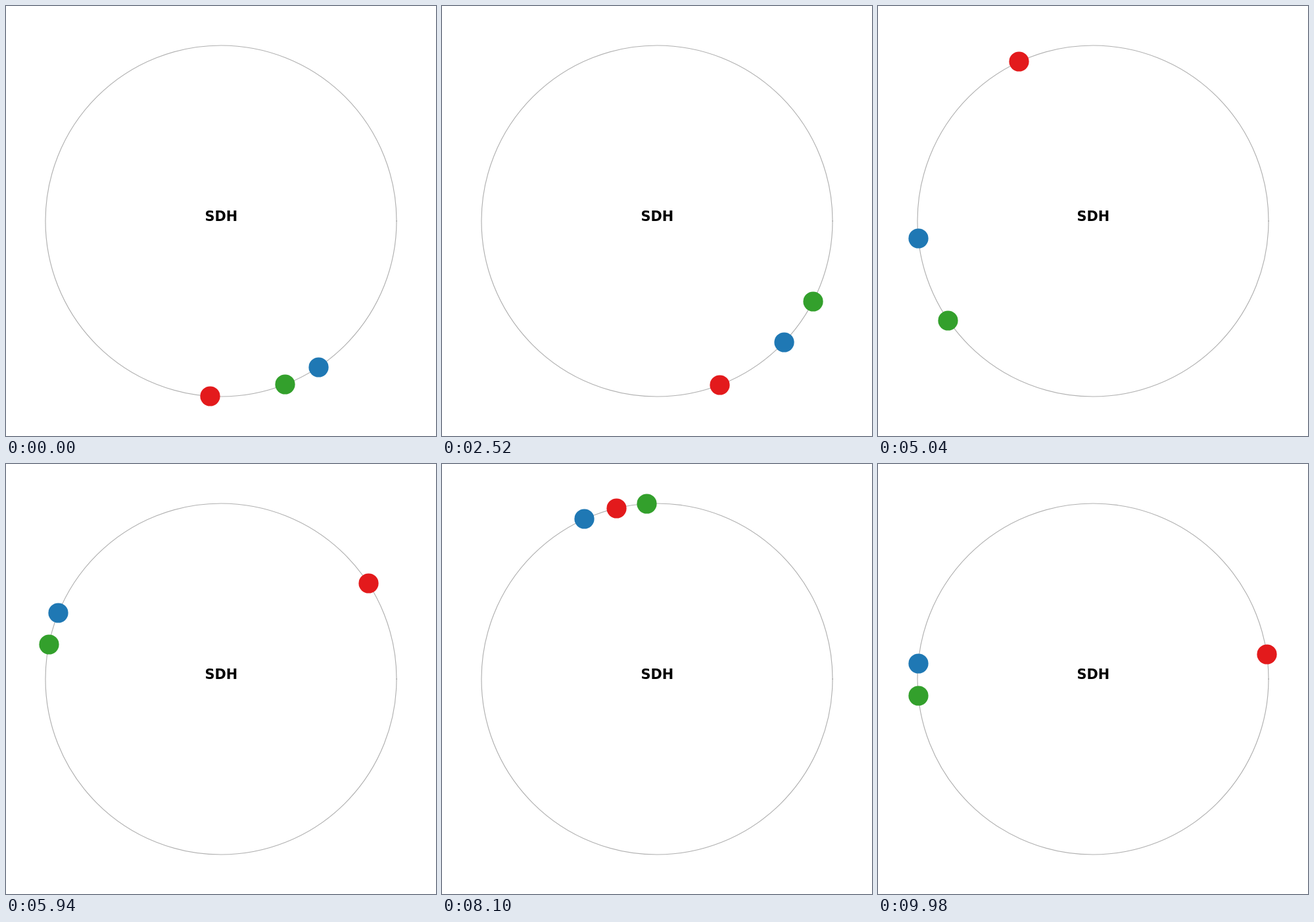
Recreate the animation shown at these times as an HTML page. Size 654 px wide and 654 px high, loop 10000 ms.

```html
<!DOCTYPE html>
<html lang="en">
<head>
<meta charset="utf-8">
<title>SDH</title>
<style>
  html, body { margin: 0; width: 100%; height: 100%; overflow: hidden; background: #fff; }
  svg { display: block; width: 654px; height: 654px; }
  text { font: bold 20.83px "DejaVu Sans", sans-serif; text-anchor: middle; }
</style>
</head>
<body>
<svg viewBox="0 0 654 654">
  <circle cx="327" cy="327" r="267" fill="none" stroke="#b0b0b0" stroke-width="1.15"/>
  <path d="M593.4 327h1.2" stroke="#888"/>
  <text x="327.4" y="327">SDH</text>
  <g id="dots"></g>
</svg>
<script>
const LOOP = 10000, STEP = 20, CENTER = 327, RADIUS = 267;

// Shared key times in ms; each dot has a counter-clockwise angle in degrees per key.
const times = [480, 2520, 3600, 5040, 6920, 8100, 8640, 9980];
const dots = [
  makeDot('#e31a1c', [-93.5, -69, -27.4, 114.9, -48, 103.4, 174, 368.1]),
  makeDot('#1f78b4', [-56.3, -43.6, -6.9, 185.8, 93.7, 114.4, 128, 175]),
  makeDot('#33a02c', [-68.6, -27.3, 39.5, 214.5, 85.4, 93.4, 94, 185.5])
];

function makeDot(color, angles) {
  const node = document.createElementNS('http://www.w3.org/2000/svg', 'circle');
  node.setAttribute('r', 15.1);
  node.setAttribute('fill', color);
  document.getElementById('dots').append(node);
  return { node, angles, slopes: findSlopes(angles) };
}

// Starts at rest; inner slopes follow the parabola through neighbouring keys.
function findSlopes(angles) {
  const gap = i => times[i + 1] - times[i];
  const rate = i => (angles[i + 1] - angles[i]) / gap(i);
  const last = times.length - 1;
  return times.map((_, i) => {
    if (i === 0) return 0;
    if (i === last) return rate(i - 1);
    return (rate(i - 1) * gap(i) + rate(i) * gap(i - 1)) / (gap(i - 1) + gap(i));
  });
}

// Cubic Hermite curve through the keys.
function angleAt({ angles, slopes }, t) {
  if (t <= times[0]) return angles[0];
  const b = times.findIndex(key => key >= t), a = b - 1;
  const h = times[b] - times[a], u = (t - times[a]) / h, v = 1 - u;
  return v * v * (1 + 2 * u) * angles[a] + u * u * (1 + 2 * v) * angles[b]
    + h * u * v * (v * slopes[a] - u * slopes[b]);
}

// Dots sit on whole pixels.
const snap = x => Math.floor(x) + 0.5;

function draw(now) {
  const t = Math.floor(now % LOOP / STEP) * STEP;
  for (const dot of dots) {
    const a = angleAt(dot, t) * Math.PI / 180;
    dot.node.setAttribute('cx', snap(CENTER + RADIUS * Math.cos(a)));
    dot.node.setAttribute('cy', snap(CENTER - RADIUS * Math.sin(a)));
  }
}

const start = performance.now();
function tick() {
  draw(performance.now() - start);
  requestAnimationFrame(tick);
}
tick();
</script>
</body>
</html>
```
